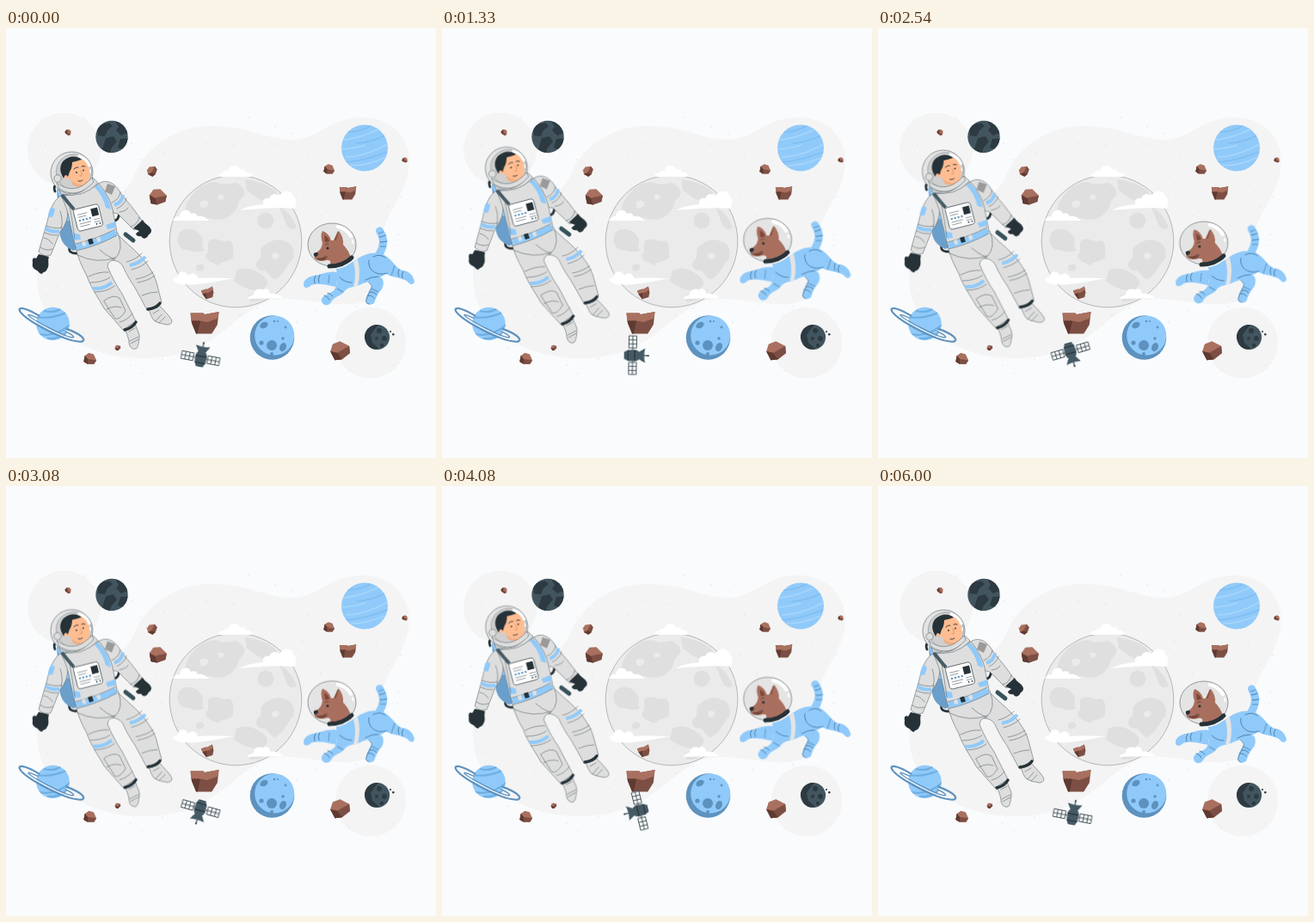
Animation of 500x500 px, one loop 6040 ms. Source, as an HTML page without scripts:

```html
<!DOCTYPE html>
<html lang="en">
<head>
<meta charset="utf-8">
<title>Space float</title>
<style>
html, body { margin: 0; width: 100%; height: 100%; overflow: hidden; background: #f9fbfd; }
svg { display: block; width: 100vw; height: 100vh; }

.haze { fill: #f4f4f4; }
.stars { stroke: #dedede; stroke-width: 1.5; stroke-linecap: round; }
.sea { fill: #dfdfdf; }
.cloud { fill: #fff; }
.sky { fill: #90cafa; }
.steel { fill: #5e92be; }
.ink { fill: #263238; }
.slate { fill: #455a64; }
.globe { fill: #42555f; }
.land { fill: #2d3a41; }
.suit { fill: #dedede; stroke: #5d686d; stroke-width: .6; stroke-linejoin: round; }
.line { fill: none; stroke: var(--c, #5d686d); stroke-width: var(--w, .6); stroke-linecap: round; }
.band { fill: none; stroke: #90cafa; stroke-width: 4; }
.cuff { fill: none; stroke: var(--c, #263238); stroke-width: var(--w, 3.4); stroke-linecap: round; }
.glass { fill: #e4e4e4; stroke: #69747a; stroke-width: .7; }
.shine { fill: none; stroke: #fff; stroke-linecap: round; }

.float, .spin { transform-box: view-box; animation: 6.04s linear infinite; }
.float { animation-name: float; }
.man { transform-origin: 110px 255px; }
.dog { transform-origin: 410px 275px; }
.spin { animation-name: spin; transform-origin: 226px 379.5px; }

@keyframes float {
  0%, 49.67%, 99.34%, 100% { transform: none; }
  24.83%, 74.5% { transform: translateY(-7px) rotate(-1.2deg); }
}
@keyframes spin {
  0% { transform: rotate(0deg); }
  99.34%, 100% { transform: rotate(360deg); }
}
</style>
</head>
<body>
<svg viewBox="0 0 500 500" xmlns="http://www.w3.org/2000/svg">
<defs>
  <!-- rocks fit a 20 unit box around 0,0 -->
  <g id="bowl">
    <path fill="#7d4f44" d="M-10-7-1-7 0-6 10-8 9 2 5 9-6 9-9 1Z"/>
    <path fill="#a9705f" d="M-10-7-1-7 0-6 10-8 9.500-3 2 0-3-1-9.500-1Z"/>
    <path fill="#5f3a31" d="M-9.500-1-3-1-5 9-6 9-9 1Z"/>
  </g>
  <g id="rock">
    <path fill="#a9705f" d="M-10-3-5-9 3-9 10-1 8 6-2 9-9 7Z"/>
    <path fill="#7d4f44" d="M-10-3-4 1 2 0 10-1 8 6-2 9-9 7Z"/>
    <path fill="#5f3a31" d="M-10-3-4 1-2 9-9 7Z"/>
  </g>
  <g id="panel">
    <path fill="#fafafa" stroke="#37474f" stroke-width=".9" d="M-7-4.500H7V4.500H-7ZM-7 0H7M-2.400-4.500V4.500M2.400-4.500V4.500"/>
  </g>
  <clipPath id="moonClip"><circle cx="267" cy="248" r="76.600"/></clipPath>
  <clipPath id="darkClip"><circle cx="123" cy="126.500" r="18.700"/></clipPath>
  <clipPath id="miniClip"><circle cx="431.500" cy="359.500" r="14.600"/></clipPath>
  <clipPath id="gasClip"><circle cx="417" cy="139.500" r="27"/></clipPath>
  <clipPath id="ringClip"><circle cx="54.500" cy="344" r="19.300"/></clipPath>
</defs>

<!-- backdrop -->
<g class="haze">
  <circle cx="67.500" cy="141" r="42.500"/>
  <circle cx="424" cy="366" r="41.300"/>
  <path d="M36 290C36 222 130 217 149 172C164 135 200 114 238 114C285 114 300 130 335 130C365 128 375 105 413 104C450 103 470 130 469 158C466 198 437 215 437 250C437 280 442 295 425 313C400 334 340 308 308 317C262 330 245 384 160 384C90 384 36 345 36 290Z"/>
</g>
<path class="stars" d="M282 104h0M313 115h0M333 123h0M264 137h0M312 136h0M146 134h0M184 146h0M157 153h0M216 150h0M233 134h0M352 150h0M345 181h0M366 218h0M346 197h0M181 252h0M175 222h0M24 232h0M34 210h0M60 300h0M47 311h0M77 372h0M108 334h0M158 402h0M182 385h0M145 392h0M194 351h0M272 334h0M292 326h0M338 342h0M361 330h0M408 324h0M444 208h0M459 196h0M431 182h0M456 240h0M455 253h0M399 398h0M451 392h0M91 105h0M46 136h0"/>

<!-- moon -->
<circle cx="267" cy="248" r="77" fill="#ebebeb"/>
<g class="sea" clip-path="url(#moonClip)">
  <path d="M219 191C229 180 243 176 252 182L268 180C276 185 281 191 275 197C269 201 271 208 265 214C257 224 246 224 236 221C226 224 216 219 212 224C205 217 208 203 219 191Z"/>
  <path d="M278 176C292 178 307 182 315 192C321 200 314 203 306 201C294 202 287 193 280 189Z"/>
  <circle cx="302" cy="224" r="9.500"/>
  <path d="M204 236C213 231 224 235 227 243C233 249 224 253 231 258C222 264 215 257 208 258C198 255 197 241 204 236Z"/>
  <path d="M238 246C248 244 252 250 260 247C267 253 263 261 264 267C258 273 251 270 247 276C240 272 233 272 232 264C239 259 231 251 238 246Z"/>
  <path d="M299 254C307 247 316 244 324 248C334 250 336 260 334 268C327 275 324 285 316 290C311 297 307 286 301 282C293 283 288 276 293 270C300 267 293 260 299 254Z"/>
  <path d="M268 282C279 276 291 281 301 290C309 298 300 306 291 305C280 305 273 299 265 295Z"/>
  <path d="M318 208Q331 214 338 232Q330 238 325 226ZM282 311q12-5 24 0q-9 8-22 7ZM222 276q7-4 9 3q-5 6-10 2Z"/>
  <path fill="#ebebeb" d="M225 203q6-5 11 0q-2 7-9 6ZM246 195q5-3 8 1q-2 5-7 3ZM309 263q6-4 9 1q-3 7-8 4Z"/>
</g>
<circle cx="267" cy="248" r="76.800" fill="none" stroke="#a0a0a0" stroke-width=".7"/>

<g class="cloud">
  <path d="M247 173C248 168 251 169 253 168C255 165 258 167 259 165C260 159 270 158 273 165C276 163 279 166 279 168C284 167 286 170 287 173Z"/>
  <path d="M194 224C196 219 199 219 202 219C202 211 213 209 215 216C220 214 222 217 223 219C229 218 233 221 236 224Z"/>
  <path d="M272 212C281 207 291 206 299 205C298 199 302 197 306 198C308 192 315 192 318 195C323 187 333 189 334 195C339 200 338 207 335 210C322 208 291 210 272 212Z"/>
  <path d="M194 293C195 289 199 291 200 289C200 281 210 282 212 288C217 282 223 287 223 291C238 290 253 291 265 291C247 294 224 300 207 298Q197 298 194 293Z"/>
  <path d="M281 315C282 311 285 311 288 310C288 304 295 302 299 305C303 301 307 305 307 309C313 308 320 311 323 314Z"/>
</g>

<!-- dark planets -->
<circle class="globe" cx="123" cy="126.500" r="18.700"/>
<path class="land" clip-path="url(#darkClip)" d="M106 117C113 108 118 112 120 110L124 114 118 119 115 126 107 125ZM127 108L138 112 142 122 134 125 128 119 131 115ZM116 128L125 126 129 132 123 139 120 147 112 141ZM133 129L144 128 137 142 130 139Z"/>
<circle class="globe" cx="431.500" cy="359.500" r="14.600"/>
<g class="land" clip-path="url(#miniClip)">
  <path d="M417 360C417 348 426 345 434 344L428 351 424 357 426 366 434 373 423 374Z"/>
  <circle cx="434" cy="352" r="3"/><circle cx="440" cy="361" r="3"/><circle cx="431" cy="361" r="2"/><circle cx="437" cy="369" r="2.200"/>
</g>
<circle class="ink" cx="447" cy="353" r="1"/><circle class="ink" cx="450.300" cy="356.300" r="1.200"/>

<!-- striped planet -->
<circle class="sky" cx="417" cy="139.500" r="27"/>
<g clip-path="url(#gasClip)" fill="none" stroke-width="1.700">
  <path stroke="#a6d5fb" d="M391 130Q412 129 439 115M395 150Q417 150 446 134M388 141Q402 141 418 136M401 160Q420 160 440 151"/>
  <path stroke="#82bdf0" d="M397 121Q412 121 428 112M408 134Q425 133 443 124M391 156Q413 156 443 144"/>
</g>

<!-- cratered planet -->
<circle class="steel" cx="309.500" cy="360" r="25.800"/>
<circle class="sky" cx="312.200" cy="357.600" r="23"/>
<g class="steel">
  <ellipse cx="300" cy="345.500" rx="5" ry="3.400" transform="rotate(-30 300 345.500)"/>
  <circle cx="309" cy="369" r="6"/>
  <ellipse cx="322" cy="371" rx="3.800" ry="5.200" transform="rotate(25 322 371)"/>
  <circle cx="297" cy="366" r="2.600"/><circle cx="322" cy="361" r="1.700"/><circle cx="325" cy="348" r="1.400"/><circle cx="312" cy="341" r="1.300"/><circle cx="309" cy="379" r="2"/><circle cx="316" cy="341" r="1"/>
</g>

<!-- ringed planet -->
<circle class="sky" cx="54.500" cy="344" r="19.300"/>
<g clip-path="url(#ringClip)" fill="none" stroke="#6faee0" stroke-width="2.200">
  <path d="M36 336Q53 339 72 330M44 329Q56 332 64 326M36 355Q55 362 76 344M48 361Q60 362 70 355"/>
</g>
<g transform="rotate(25.500 53 345)" fill="none">
  <path stroke="#5e92be" stroke-width="2.200" d="M36 342C1 338 1 352 53 353S105 338 70 342"/>
  <path stroke="#f6f6f6" stroke-width="1.200" d="M35 344C8 342 10 350 53 351S98 342 71 344"/>
  <path stroke="#5e92be" stroke-width="1.300" d="M36 345C17 345 18 348.500 53 349.500S89 345 70 345"/>
</g>

<!-- rocks -->
<use href="#rock" transform="translate(72.500 121.500) rotate(50) scale(.36)"/>
<use href="#rock" transform="translate(170 166) rotate(-55) scale(.6)"/>
<use href="#rock" transform="translate(177 196.500) rotate(-4)"/>
<use href="#rock" transform="translate(376 164.500) rotate(18) scale(.62)"/>
<use href="#bowl" transform="translate(397.500 191.500) scale(.97 .9)"/>
<use href="#rock" transform="translate(464 153.500) rotate(35) scale(.32)"/>
<use href="#bowl" transform="translate(235 308) rotate(-18) scale(.7)"/>
<use href="#bowl" transform="translate(231 342) scale(1.650 1.500)"/>
<use href="#rock" transform="translate(98 385) rotate(16) scale(.72)"/>
<use href="#rock" transform="translate(130 371.500) rotate(-30) scale(.33)"/>
<use href="#rock" transform="translate(389 375) rotate(-22) scale(1.140)"/>

<!-- satellite -->
<g class="spin">
  <g transform="translate(226.500 384) rotate(11)">
    <path stroke="#37474f" stroke-width="1.200" d="M-10 0H10M0-18V-8"/>
    <use href="#panel" x="-15.800"/><use href="#panel" x="15"/>
    <path class="slate" d="M-8.500-14.500Q0-12.500 8.500-14.500L3.500-6H-3.500Z"/>
    <path class="slate" d="M-5-7H5L6.500-4V5L4 10H-4L-6.500 5V-4Z"/>
    <path class="ink" d="M-6.500-3H6.500V-1.800H-6.500ZM-6 5H6V6H-6Z"/>
    <circle class="slate" cy="-18" r="1.200"/>
  </g>
</g>

<!-- astronaut -->
<g class="float man">
  <g class="cuff" style="--w: 2.8">
    <path d="M62 181Q54 182 57 190M75 252Q70 262 82 262M122 211Q134 209 131 219Q129 226 123 223"/>
  </g>
  <path fill="#6b9fcb" d="M59 187Q69 184 75 194L86 256 78 259Q66 254 63 242Z"/>
  <path class="sky" d="M59 187Q66 184 72 190L77 224 70 224Z"/>
  <path class="cuff" style="--c: #37525c; --w: 5" d="M139 240L148 247"/>

  <!-- boots -->
  <path class="suit" d="M138 349L150 342C151 350 156 354 155 361C154 366 154 371 151 373C146 374 143 370 143 365C142 358 140 355 138 349Z"/>
  <path class="suit" d="M166 327L178 322C181 326 187 331 191 337C195 342 192 345 187 345C182 344 176 343 172 340C169 336 168 333 166 327Z"/>
  <path class="line" d="M144 364l10-5M145 367l9-5M143 353l7-4M174 341l7-8M178 343l7-7M171 332l7-4"/>

  <!-- legs -->
  <path class="suit" d="M108 252L130 240C138 249 148 256 155 264C163 272 172 285 175 296L181 319 164 328 150 302C146 296 140 287 136 277Q132 270 122 270Z"/>
  <path class="suit" d="M81 255L130 238Q138 258 126 269Q119 270 118 277C122 287 128 299 135 309L151 341 136 351 114 326C107 313 98 301 94 288Q84 270 81 255Z"/>
  <path class="band" d="M101 303Q114 304 123 296M144 276Q155 274 162 266"/>
  <path class="line" d="M83 264Q106 275 127 267M96 289Q108 283 119 284M98 296Q112 296 121 290M103 307Q117 307 126 300M146 281Q158 278 165 271M140 272Q150 270 158 262M151 292Q163 290 171 284M153 296Q165 294 173 288M109 258Q115 264 126 269"/>
  <path class="line" d="M114 317Q125 309 132 314L139 329Q132 340 127 338ZM117 327Q127 322 134 325M158 311Q167 307 176 307M132 342Q141 340 147 332"/>
  <path class="cuff" d="M138 351Q147 349 151 342M165 327Q175 326 179 320"/>

  <!-- arms -->
  <path class="suit" d="M69 193C57 195 51 211 48 225L38 260Q44 267 52 264L63 237Q72 227 72 212Z"/>
  <path class="band" d="M46 233Q53 238 62 236"/>
  <rect class="sky" x="50" y="209" width="6" height="11" rx="2.500" transform="rotate(17 53 214)"/>
  <path class="line" d="M45 238Q53 242 60 241M47 230Q56 234 65 232M40 255Q47 260 54 257M63 213Q67 224 64 234M44 244q6 1 10 7"/>
  <path class="suit" d="M104 184C114 174 125 179 131 188C136 197 146 206 158 224Q158 231 149 235L130 216 117 213Z"/>
  <path class="band" d="M126 206Q135 203 136 194"/>
  <path fill="#9a9a9a" d="M118 181L127 184 123 194 115 190Z"/>
  <path class="line" d="M129 210Q138 206 140 198M123 203Q132 199 133 191M145 231Q153 229 155 220M132 214q8-1 10-5"/>
  <path class="ink" d="M38 263L50 266C48 271 51 276 48 280C46 285 43 283 42 286C39 286 38 283 36 282C32 280 30 278 31 273C30 268 32 266 35 268Z"/>
  <path class="ink" d="M148 233L159 223C161 228 167 229 169 235C169 240 166 239 165 242C162 246 159 245 157 242C154 243 151 241 151 239L155 236Z"/>

  <!-- torso -->
  <path class="suit" d="M64 195C77 195 97 190 108 181Q120 195 124 211L129 237Q106 251 81 255L75 230Q72 210 64 195Z"/>
  <path class="sky" d="M107 182Q120 195 122 211L116 209Q113 195 103 185ZM77 238L86 240 87 246 79 247ZM116 229L127 225 128 232 118 234Z"/>
  <path fill="none" stroke="#455a64" stroke-width="4" d="M65 194Q72 203 79 211"/>
  <path fill="none" stroke="#90cafa" stroke-width="7" d="M82 255Q106 249 128 238"/>
  <path class="line" d="M81 251Q106 245 127 234M82 259Q108 253 129 241M73 202Q77 222 80 245"/>
  <path class="ink" d="M95 246l5-1.500 2 6-5 1.500Z"/>
  <path fill="#e0e0e0" d="M88 249l4-1 1.500 5-4 1ZM105 244l4-1.500 1.500 5-4 1.500Z"/>
  <g transform="translate(95.500 220.500) rotate(-14)">
    <rect x="-15" y="-13" width="30" height="26" rx="3.500" fill="#fff" stroke="#4d5a60" stroke-width=".8"/>
    <rect class="ink" x="5" y="-9" width="8" height="9"/>
    <path class="line" d="M-11-6H0M-11-3H-2M-11 5H2M-11 8H0M6 4H13M6 7H13"/>
    <path stroke="#5e92be" stroke-width="2.400" stroke-linecap="round" d="M-10 1h0M-6 1h0M-2 1h0M2 1h0"/>
    <path stroke="#263238" stroke-width="1.800" stroke-linecap="round" d="M8 9.500h0M12 9.500h0"/>
  </g>

  <!-- head -->
  <path class="suit" d="M60 184Q80 196 101 174L107 180Q90 199 64 193Z"/>
  <circle class="glass" cx="76.500" cy="168.500" r="24.500"/>
  <circle cx="79" cy="167.500" r="20.700" fill="#cfcfcf" stroke="#7f898e" stroke-width=".6"/>
  <path fill="#f0ae82" d="M73 171L78 183Q86 187 91 182L89 172Z"/>
  <path fill="#ffbd91" d="M70 158C77 151 89 149 94 156C98 165 99 178 93 182C85 184 77 180 73 174Q68 178 67 171Q68 168 71 169Z"/>
  <path class="ink" d="M65 171C61 163 64 154 72 151C79 148 85 150 88 153Q82 155 77 156Q77 163 74 167L72 173Q69 168 67 175Z"/>
  <g class="line" style="--c: #263238; --w: .9">
    <path d="M79 164q3-3 5-2M88 161q2-1 4 0M84 178q3 1 5-1"/>
  </g>
  <path class="line" style="--c: #c77e55" d="M87 166q2 4 1 6l-2 0"/>
  <circle class="ink" cx="82" cy="168" r=".9"/><circle class="ink" cx="90" cy="165.500" r=".9"/>
  <path class="shine" stroke-width="3.400" d="M85 149Q94 152 97 160"/>
  <path class="shine" stroke-width="1.600" d="M98 165l.3 3"/>
  <path class="suit" d="M59 180Q80 196 100 174L102 179Q83 200 62 187Z"/>
  <circle class="suit" cx="60" cy="175" r="4.200"/>
</g>

<!-- dog -->
<g class="float dog">
  <path class="cuff" style="--c: #90cafa; --w: 9" d="M434.500 236Q443 248 434 263"/>
  <path class="steel" d="M415 288Q430 287 437 292C439 298 437 303 434 306C430 311 428 315 427 320Q421 324 418 318C419 310 424 305 425 300Z"/>
  <path class="sky" d="M417 290Q432 285 438 292C440 298 438 303 435 306C431 311 430 315 428 320Q422 323 419 318C421 310 425 305 426 300Z"/>
  <path class="sky" d="M386 284C377 282 367 286 359 288C353 288 345 293 346 299C347 304 352 302 355 299C363 296 373 299 384 301Z"/>
  <path class="sky" d="M384 280C393 280 400 273 407 270C416 262 431 259 440 264C449 269 453 279 461 282C468 282 474 288 475 295C473 300 469 298 466 294C459 290 449 290 442 286C434 291 425 294 415 297C407 302 397 300 393 307C389 312 381 312 378 319C374 325 366 322 367 315C370 309 378 309 382 304Q387 297 384 280Z"/>
  <path fill="#e4e4e4" d="M404 272L409 269Q413 284 409 300L404 301Q408 286 404 272Z"/>
  <g class="line" style="--c: #3f6f99; --w: .8">
    <path d="M422 270C420 282 432 289 443 285M427 266q8-4 14 1M360 288q-3 4-1 9M365 287q-3 4-1 9M370 311q4 1 6 5M374 308q4 1 6 4M423 307q4-1 8 3M421 311q4-1 7 3M457 281q-2 5 0 8M462 283q-3 4-1 8M434 243q4 0 7-2M435 249q4 0 8-1M388 290q6 6 14 6M418 293q7-4 15-4"/>
  </g>
  <path fill="none" stroke="#6fa6d3" stroke-width="1.500" d="M433 239l6-2M435 254l7 0M425 303l8 4M376 287l-1 10M452 276l-4 12M385 303l7 4"/>

  <ellipse class="glass" cx="379" cy="252" rx="28" ry="25"/>
  <path fill="#8a5443" d="M381 247L386 236Q392 242 391 252Z"/>
  <path fill="#a96f5e" d="M368 250Q365 241 368 236Q376 239 378 247L384 247 387 236Q393 244 392 252C398 258 401 265 402 271Q389 277 377 275C378 271 377 270 373 270C367 272 361 271 359 268Q357 264 361 261Q367 258 368 250Z"/>
  <path fill="#7a4738" d="M370 241Q375 243 376 248L371 249ZM360 268Q368 269 374 265Q373 271 365 270Z"/>
  <path class="ink" d="M358 262q3-2 5 0q0 3-3 4q-3-1-2-4Z"/>
  <circle class="ink" cx="374" cy="256" r="1.600"/>
  <path class="line" style="--c: #263238" d="M362 268q6 1 10-3M371 252q2-2 4-1"/>
  <path class="shine" stroke-width="4.200" d="M386 231Q396 233 401 242"/>
  <path class="shine" stroke-width="2" d="M403 247l.6 3"/>
  <path class="cuff" style="--w: 5" d="M376 277Q392 277 402 267"/>
</g>
</svg>
</body>
</html>
```
